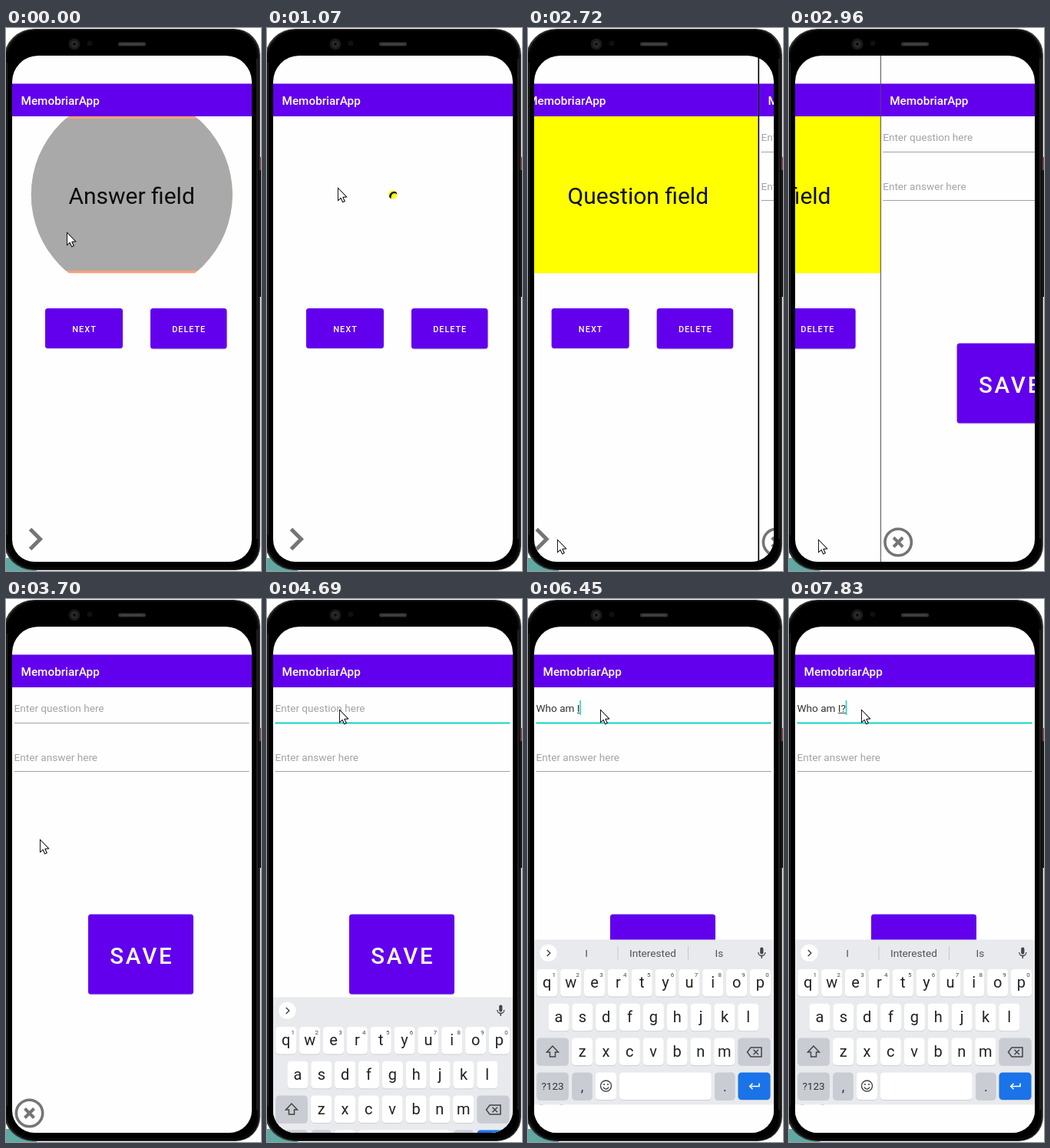
Write an HTML page with a canvas that moves like this. It is 332 px wide and 707 px high and loops after 8 s.

```html
<!DOCTYPE html>
<html lang="en">
<head>
<meta charset="utf-8">
<title>Flashcards</title>
<style>
html, body { margin: 0; width: 100%; height: 100%; overflow: hidden; background: #fff; }
canvas { display: block; width: 332px; height: 707px; }
</style>
</head>
<body>
<canvas id="stage"></canvas>
<script>
const W = 332, H = 707, LOOP = 8000;
const canvas = document.getElementById('stage');
const dpr = window.devicePixelRatio || 1;
canvas.width = W * dpr;
canvas.height = H * dpr;
const c = canvas.getContext('2d');

const PURPLE = '#6200ee', TEAL = '#15d3c4', ICON = '#757575';
const SCREEN = { x: 8, y: 36, w: 312, h: 659 };

const TICKS = [0, 150, 280, 420, 540, 1070, 1190, 1310, 1430, 1550, 1700, 1820, 1940, 2060,
  2210, 2720, 2840, 2960, 3080, 3200, 3700, 3820, 3940, 4080, 4200, 4320, 4690, 4810,
  5200, 5320, 5440, 5690, 5810, 5930, 6050, 6170, 6450, 6830, 7330, 7830];

// time, x, y
const POINTER = [[0, 79, 266], [280, 79, 266], [540, 92, 208], [1070, 92, 208],
  [1310, 93, 266], [1700, 93, 266], [2060, 38, 658], [2210, 38, 666], [3200, 38, 666],
  [3700, 44, 313], [3940, 82, 168], [4200, 94, 144]];

// time, text, first underlined letter, suggestions
const TYPING = [
  [0, '', 0, ''],
  [5200, 'W', 0, 'W,We,What'],
  [5320, 'Wh', 0, 'Wh,Who,What'],
  [5440, 'Who', 0, 'Wh,Who,What'],
  [5690, 'Who ', 4, 'is,are,was'],
  [5810, 'Who a', 4, 'a,and,are'],
  [5930, 'Who am', 4, 'am,amazing,among'],
  [6050, 'Who am ', 7, 'I,the,not'],
  [6170, 'Who am I', 8, 'I,the,not'],
  [6450, 'Who am I', 7, 'I,Interested,Is'],
  [7830, 'Who am I?', 7, 'I,Interested,Is']
];

const clamp = v => Math.max(0, Math.min(1, v));
const ease = v => 0.5 - Math.cos(Math.PI * clamp(v)) / 2;
const latest = (list, t, key = v => v) => list.filter(v => key(v) <= t).pop();

function rect(x, y, w, h, color, r = 0) {
  c.fillStyle = color;
  c.beginPath();
  c.roundRect(x, y, w, h, r);
  c.fill();
}

function disc(x, y, r, color) {
  c.fillStyle = color;
  c.beginPath();
  c.arc(x, y, r, 0, 7);
  c.fill();
}

function ring(x, y, r, color, width) {
  c.strokeStyle = color;
  c.lineWidth = width;
  c.beginPath();
  c.arc(x, y, r, 0, 7);
  c.stroke();
}

function path(points, color, width, closed = false) {
  c.strokeStyle = color;
  c.lineWidth = width;
  c.beginPath();
  points.forEach(([x, y]) => c.lineTo(x, y));
  if (closed) c.closePath();
  c.stroke();
}

function text(str, x, y, size, color, { weight = 400, align = 'center', gap = 0 } = {}) {
  c.font = `${weight} ${size}px Roboto, sans-serif`;
  c.letterSpacing = gap + 'px';
  c.textAlign = align;
  c.fillStyle = color;
  c.fillText(str, x + (align === 'center' ? gap / 2 : 0), y);
  return c.measureText(str).width;
}

function clipped(shape, draw) {
  c.save();
  c.beginPath();
  shape();
  c.clip();
  draw();
  c.restore();
}

function drawPhone() {
  rect(0, 0, W, H, '#fff');
  rect(0, 690, 40, 17, '#5fa9a2');
  rect(330, 168, 2, 46, '#a8505a');
  rect(-3, 1, 334, 705, '#303030', [40, 34, 32, 38]);
  rect(-1, 2, 330, 703, '#080808', [40, 34, 30, 38]);
  rect(2, 4, 324, 698, '#000', [38, 32, 28, 36]);
  path([[1.5, 45], [1.5, 660]], '#262626', 1);
  path([[327, 40], [327, 665]], '#343434', 1.2);
  rect(329, 185, 3, 165, '#151515');
  disc(89, 21, 7.5, '#191919');
  disc(89, 21, 4.5, '#2b2b2e');
  disc(89, 21, 2, '#0b0b0d');
  disc(109, 20, 3.5, '#101010');
  rect(146, 18.5, 36, 5, '#333', 2.5);
  rect(149, 20, 30, 2, '#424242', 1);
}

function appBar() {
  rect(8, 36, 312, 659, '#fefefe');
  rect(8, 72.5, 312, 42.5, PURPLE);
  text('MemobriarApp', 19.5, 100, 15.3, '#fff', { weight: 500, align: 'left' });
}

function button(label, x, y, w, h, size, gap, base) {
  rect(x, y + 1, w, h, '#d5d0de', 3.5);
  rect(x, y, w, h, PURPLE, 3.5);
  text(label, x + w / 2, base, size, '#fff', { weight: 500, gap });
}

function card(label, color, r, edge) {
  if (r <= 0) return;
  clipped(() => c.arc(163.8, 217, r, 0, 7), () => {
    rect(8, 115, 312, 204.3, edge || color);
    if (edge) rect(8, 118, 312, 198, color);
    text(label, 163.6, 228.7, 30, '#0c0c0c');
  });
}

function drawCards(t) {
  appBar();
  const radius = start => t - start > 975 ? 300 : 186.5 * ease((t - start) / 980);
  clipped(() => c.rect(8, 115, 312, 205), () => {
    if (t < 1070) card('Answer field', '#a9a9a9', radius(-620), '#ffa07a');
    else card('Question field', '#ffff00', radius(962));
  });
  button('NEXT', 51, 365, 101, 52, 11, 1, 395.7);
  button('DELETE', 188, 365, 99.5, 52.5, 11, 0.9, 395.7);
  path([[31.5, 652.5], [44.5, 665.5], [31.5, 678.5]], ICON, 5);
}

function field(y, hint, focused) {
  rect(10.5, y + (focused ? 18.6 : 19), 306, focused ? 1.8 : 1, focused ? TEAL : '#a2a2a2');
  if (hint) text(hint, 10.5, y + 4.5, 13.6, '#a3a3a3', { align: 'left' });
}

function drawForm(t) {
  appBar();
  const [, typed, from] = latest(TYPING, t, v => v[0]);
  const focused = t >= 4200;
  field(142, typed ? '' : 'Enter question here', focused);
  field(205, '', false);
  text('Enter answer here', 10.5, 211, 13.6, '#a3a3a3', { align: 'left' });

  const end = text(typed, 10.5, 146.5, 13.6, '#333', { align: 'left' });
  const start = c.measureText(typed.slice(0, from)).width;
  if (end > start) rect(10.5 + start, 148, end - start, 1, '#444');
  const blink = (t >= 4690 && t < 5200) || (t >= 6830 && t < 7330);
  if (focused && !blink) rect(10.3 + end, 132, 1.5, 19, TEAL);

  button('SAVE', 107, 410.5, 137, 104, 29.5, 2.8, 474.7);
  ring(30.5, 669.5, 17.2, ICON, 3.6);
  path([[24.5, 663.5], [36.5, 675.5]], ICON, 4);
  path([[36.5, 663.5], [24.5, 675.5]], ICON, 4);
}

function key(x, y, w, color = '#fff') {
  rect(x, y + 1, w, 35.5, '#cdd0d4', 4.5);
  rect(x, y, w, 35.5, color, 4.5);
}

function letterRow(letters, x, y, digits) {
  [...letters].forEach((ch, i) => {
    const cx = x + i * 30.85;
    key(cx - 13.5, y, 27);
    text(ch, cx, y + 24, 20, '#222');
    if (digits) text((i + 1) % 10, cx + 9, y + 9.5, 8, '#444');
  });
}

function drawKeyboard(t) {
  const GREY = '#c9cdd3', INK = '#444';
  rect(8, 443.5, 312, 215, '#e8eaed');
  rect(8, 658.5, 312, 140, '#fefefe');

  disc(26.5, 461.5, 11.3, '#d9dbde');
  disc(26.5, 461, 11.3, '#fff');
  path([[24.8, 457], [28.8, 461], [24.8, 465]], INK, 1.5);
  const words = latest(TYPING, t, v => v[0])[3];
  if (words) {
    words.split(',').forEach((word, i) => text(word, 76 + i * 86.4, 466, 13.6, '#50535a'));
    rect(116.5, 452, 1, 18, '#c5c8cc');
    rect(208, 452, 1, 18, '#c5c8cc');
  }
  rect(302.2, 453.5, 4.2, 9, INK, 2.1);
  c.strokeStyle = INK;
  c.lineWidth = 1.3;
  c.beginPath();
  c.arc(304.3, 460, 4.5, 0, Math.PI);
  c.stroke();
  path([[304.3, 464.5], [304.3, 468]], INK, 1.4);

  letterRow('qwertyuiop', 24.8, 482, true);
  letterRow('asdfghjkl', 40, 526.8);
  letterRow('zxcvbnm', 70.6, 571.5);

  key(11.3, 571.5, 41.5, GREY);
  path([[32, 582], [24.5, 590], [28.5, 590], [28.5, 596], [35.5, 596], [35.5, 590], [39.5, 590]], INK, 1.5, true);
  key(273.5, 571.5, 42, GREY);
  path([[285.5, 590], [290, 584], [304, 584], [304, 596], [290, 596]], INK, 1.5, true);
  path([[293.5, 586.8], [300, 593.2]], INK, 1.5);
  path([[300, 586.8], [293.5, 593.2]], INK, 1.5);

  key(11.3, 616.5, 41.5, GREY);
  text('?123', 32, 639, 13.5, '#333');
  key(57.3, 616.5, 26.5, GREY);
  text(',', 70.6, 641, 18, '#333');
  key(88, 616.5, 27);
  ring(101.5, 634, 7, INK, 1.4);
  disc(99, 632, 1.1, INK);
  disc(104, 632, 1.1, INK);
  c.beginPath();
  c.arc(101.5, 634.5, 3.6, 0.3, Math.PI - 0.3);
  c.stroke();
  key(119, 616.5, 119.7);
  key(243, 616.5, 26.5, GREY);
  text('.', 256.3, 641, 18, '#333');
  key(273.5, 616.5, 42, '#1a73e8');
  path([[301, 630.5], [301, 634.5], [289, 634.5]], '#fff', 1.6);
  path([[292.5, 630.8], [288.7, 634.5], [292.5, 638.2]], '#fff', 1.6);
}

function shifted(dx, dy, draw, t) {
  c.save();
  c.translate(dx, dy);
  draw(t);
  c.restore();
}

function drawScreen(t) {
  const p = ease((t - 2628) / 560);
  const gap = 1.5 * (1 - p);
  if (p < 1) shifted(-312 * p, 0, drawCards, t);
  if (p > 0) {
    rect(320 - 312 * p, SCREEN.y, 2, SCREEN.h, '#000');
    shifted(312 * (1 - p) + gap, 0, drawForm, t);
  }
  if (t >= 4690) shifted(0, t < 4810 ? 75 : 0, drawKeyboard, t);
}

function drawPointer(t) {
  const i = POINTER.findIndex(k => k[0] > t);
  const b = POINTER[i < 0 ? POINTER.length - 1 : i];
  const a = i < 0 ? b : POINTER[i - 1];
  const p = a === b ? 0 : (t - a[0]) / (b[0] - a[0]);
  const x = Math.round(a[1] + (b[1] - a[1]) * p) + 0.5;
  const y = Math.round(a[2] + (b[2] - a[2]) * p) + 0.5;
  const arrow = [[0, 0], [0, 16], [3.7, 12.7], [6.2, 18.2], [8.6, 17.1], [6.2, 11.8], [11, 11.4]]
    .map(([px, py]) => [x + px, y + py]);
  path(arrow, '#000', 1.1, true);
  c.fillStyle = '#fff';
  c.fill();
  path(arrow, '#111', 0.9, true);
}

function draw(now) {
  const t = latest(TICKS, now % LOOP);
  c.setTransform(dpr, 0, 0, dpr, 0, 0);
  drawPhone();
  clipped(() => c.roundRect(SCREEN.x, SCREEN.y, SCREEN.w, SCREEN.h, [34, 34, 29, 29]), () => drawScreen(t));
  drawPointer(t);
}

const begin = performance.now();
function loop() {
  draw(performance.now() - begin);
  requestAnimationFrame(loop);
}
loop();
</script>
</body>
</html>
```
